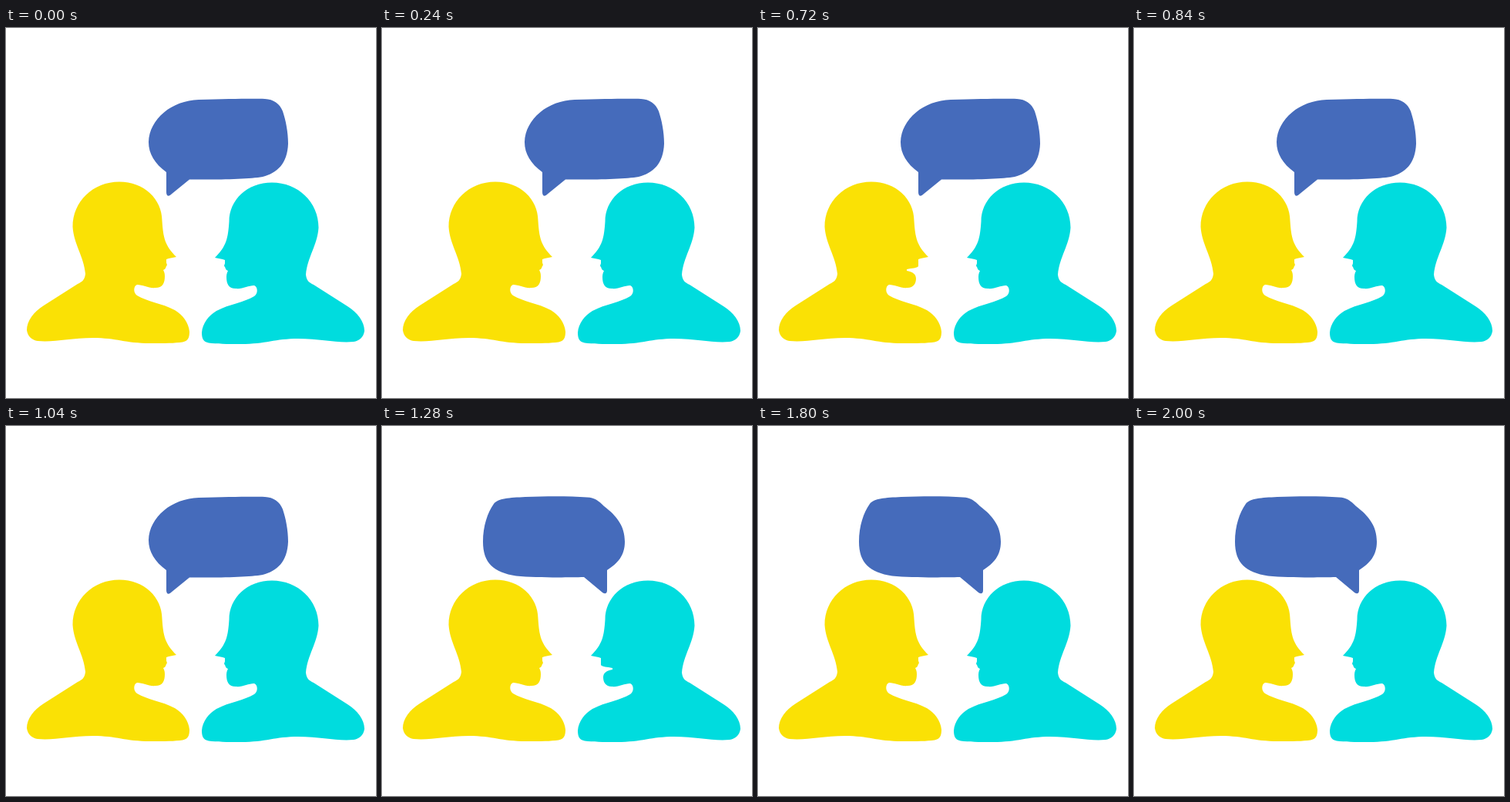
Write an HTML page with a canvas that moves like this. It is 480x480 px and loops after 2.68 s.

```html
<!DOCTYPE html>
<html lang="en">
<head>
<meta charset="utf-8">
<title>Conversation</title>
<style>
html, body { margin: 0; width: 100%; height: 100%; overflow: hidden; background: #fff; }
canvas { display: block; width: 100vw; height: 100vh; }
</style>
</head>
<body>
<canvas id="stage" width="480" height="480"></canvas>
<script>
const ctx = document.getElementById('stage').getContext('2d');
const LOOP = 2680;
const TURN = 1280; // the second speaker takes over

// Times at which each mouth toggles, starting closed.
const LEFT_TALK = [120, 200, 320, 440, 600, 640, 720, 840, 920, 1040];
const RIGHT_TALK = [1280, 1400, 1560, 1600, 1680, 1800, 1920, 2000];

const BODY = 'M147 199.5 C113 199.5 86.5 225 86.5 258 C88 281 101 296 103 319 ' +
  'C102 327 99 329 93 332 L49 360 C36 368 27 380 27 392 C28 400 34 405 41 406 ' +
  'C63 408 83 402 113 402 C143 402 155 409 187 409 C206 409 219 409 229 407.5 ' +
  'C236 406 238 402 238 394 C237 382 229 372 219 366 C202 357 183 355 170 347 ' +
  'C165 344 165 335 170 333 C178 333 185 338 194 337 ';
const MOUTH_CLOSED = 'C203 337 206 331 206 322 C206 318 205 316 204 314 ' +
  'C207 313 207 311 208 309 C210 307 208 306 208 304 L208 300 L211 299 ';
const MOUTH_OPEN = 'C202 337 205 331 205 325 C205 319 200 316 193 315 L193 313 ' +
  'C200 311 206 312 208 309 L208 300 L211 299 ';
const FACE = 'L221 297 C206 282 204 272 202.5 250 C202.5 222 179 199.5 147 199.5 Z';

const closed = new Path2D(BODY + MOUTH_CLOSED + FACE);
const open = new Path2D(BODY + MOUTH_OPEN + FACE);

const leftBubble = new Path2D('M250 93 C290 92 318 91.5 336 92 C347 92.5 355 98 359 108 ' +
  'C363 120 366 135 366 150 C365 176 352 188 333 193 C315 196 275 197 238 196.5 ' +
  'L214 216 C211 219 208 218 208 213 L208 187 C193 176 185 163 185 148 ' +
  'C186 118 215 94 250 93 Z');
const rightBubble = new Path2D('M186 92 C215 91 245 91 266 92.5 C276 93 281 97 288 104 ' +
  'C305 117 315 130 315 150 C315 168 306 178 292 187 L292 213 C292 218 289 218 286 216 ' +
  'L262 196 C240 196.5 200 197 174 194.5 C145 190 131 178 131 150 ' +
  'C131 130 137 112 145 101 C150 94 165 93 186 92 Z');

function fill(path, color) {
  ctx.fillStyle = color;
  ctx.fill(path);
}

function pose(toggles, t) {
  return toggles.filter(at => at <= t).length % 2 ? open : closed;
}

function draw(t) {
  ctx.fillStyle = '#fff';
  ctx.fillRect(0, 0, 480, 480);
  fill(t < TURN ? leftBubble : rightBubble, '#456bbb');
  fill(pose(LEFT_TALK, t), '#fae105');
  ctx.save();
  ctx.translate(492, 1);
  ctx.scale(-1, 1);
  fill(pose(RIGHT_TALK, t), '#00dcde');
  ctx.restore();
}

const start = performance.now();
function tick() {
  draw((performance.now() - start) % LOOP);
  requestAnimationFrame(tick);
}
tick();
</script>
</body>
</html>
```
